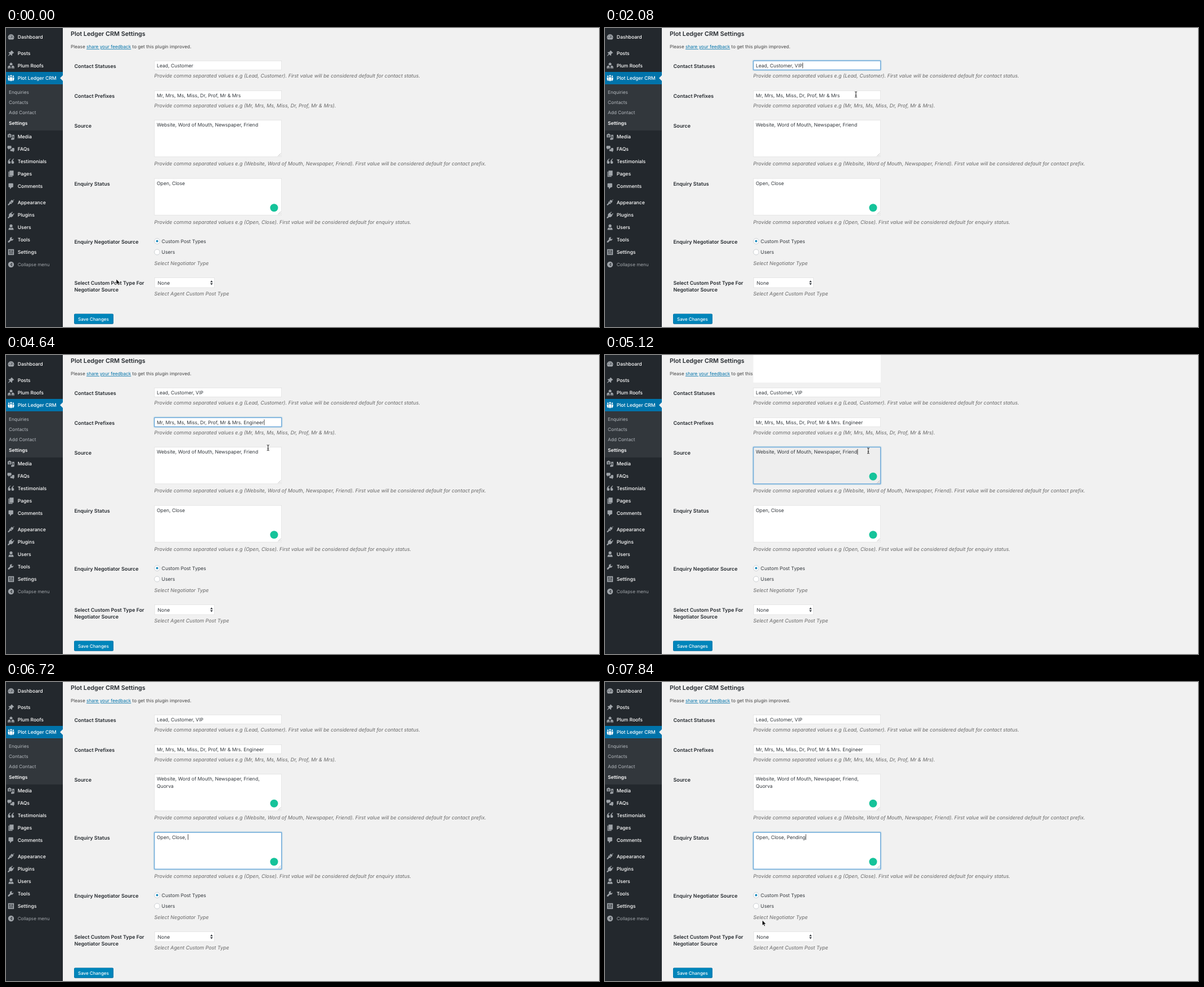
An HTML page that plays this animation: 1054 by 531 pixels, repeating every 8000 ms.

```html
<!DOCTYPE html>
<html lang="en">
<head>
<meta charset="utf-8">
<title>Plugin settings</title>
<style>
html, body { margin: 0; width: 100%; height: 100%; overflow: hidden; background: #f1f1f1; }
svg { display: block; width: 100vw; height: 100vh; }
text { font: 8.65px Inter, "Open Sans", sans-serif; fill: #32373c; white-space: pre; text-rendering: geometricPrecision; }
.menu { font-size: 8.6px; font-weight: 500; fill: #fff; }
.sub { font-size: 8.2px; fill: #b4b9be; }
.on { font-size: 8.4px; font-weight: 600; fill: #fff; }
.small { font-size: 8.1px; fill: #a0a5aa; }
.title { font-size: 10.77px; font-weight: 600; fill: #23282d; }
.para { font-size: 8.17px; fill: #444; }
.link { fill: #0073aa; text-decoration: underline; }
.label { font-size: 8.95px; font-weight: 600; fill: #23282d; }
.hint { font-size: 8.92px; font-style: italic; fill: #666; }
.button { font-size: 8px; font-weight: 500; fill: #fff; }
.box { fill: #fff; stroke: #ddd; stroke-width: .65; }
.box.focus { stroke: #5b9dd9; stroke-width: 1; filter: drop-shadow(0 0 .8px rgba(30, 140, 190, .8)); }
.icon { fill: #a0a5aa; }
.cut { fill: none; stroke: #23282d; stroke-width: 1.5; }
</style>
</head>
<body>
<svg id="stage" viewBox="0 0 1054 531"></svg>
<script>
const LOOP = 8000;
const stage = document.getElementById('stage');
const $ = id => document.getElementById(id);

// y is the vertical middle of the capitals
const text = (x, y, str, cls = '', id = '') =>
  `<text x="${x}" y="${y + 3.2}" class="${cls}" id="${id}">${str.replace(/&/g, '&amp;')}</text>`;
const rect = (x, y, w, h, fill, more = '') =>
  `<rect x="${x}" y="${y}" width="${w}" height="${h}" fill="${fill}" ${more}/>`;
const path = (d, cls = '') => `<path d="${d}" class="${cls}"/>`;
const dot = (x, y, r, more = '') => `<circle cx="${x}" cy="${y}" r="${r}" ${more}/>`;

// Icons are drawn on a 20 x 20 grid
const icons = {
  gauge: path('M4 17a8.5 8.5 0 1 1 12 0z') + path('M9.5 13L13.5 6.5M4 11h2M14 11h2M6 6.5l1.3 1.3M10 4.5v1.6', 'cut'),
  pin: path('M10.4 3l1.2-1.2 6.6 6.6-1.2 1.2-1-.2-3 3 .2 3-1.4 1.3-3.6-3.6-5.6 4.4-.8-.8 4.6-5.6-3.3-3.3 1.4-1.4 3 .2 3-3z'),
  homes: path('M10 1L5 5.5h1.5V9h7V5.5H15zM5 9l-5 5h1.5v4H4v-3h2v3h2.5v-4H10zM15 9l-5 5h1.5v4H14v-3h2v3h2.5v-4H20z'),
  people: dot(10, 4, 2.3) + dot(4, 5, 2) + dot(16, 5, 2) +
    path('M7 7.5h6V13l-1 5H8l-1-5zM1.5 8H6v5l1 4H3l-1.5-4zM14 8h4.5v5L17 17h-4l1-4z'),
  media: path('M1 4h2l1-2h4l1 2h2v8H1zM13 5h6v11a2.5 2.5 0 1 1-2-2.4V8h-2v8.5a2.5 2.5 0 1 1-2-2.4z') + dot(6, 8, 2, 'class="cut"'),
  chat: path('M2 1h7q2 0 2 2v4q0 2-2 2H6l-3 3V9H2Q0 9 0 7V3q0-2 2-2zM13 7h4q2 0 2 2v5q0 2-2 2v3l-3-3h-4q-2 0-2-2v-3h3q2 0 2-2z'),
  quote: path('M8.5 3Q5 6 5.5 9A3.7 3.7 0 1 1 1.5 13Q1 6 8 2zM18 3Q14.5 6 15 9A3.7 3.7 0 1 1 11 13Q10.5 6 17.5 2z'),
  pages: path('M6 1h11v14H6zM3 4h2v12h9v2H3z'),
  bubble: path('M5 2h9q2 0 2 2v7q0 2-2 2h-2l-5 5v-5H5q-2 0-2-2V4q0-2 2-2z'),
  brush: path('M14.5 4.5L18 1l1 1-3.5 3.5 1.5 2-4 4-5-5 4-4zM7.5 7.5l5 5-2 1.5-2-1-5.5 5-2-2 5-5.5-1-2z'),
  plug: path('M13 1l1.5 1.5L11 6l3 3 3.5-3.5L19 7l-3.5 3.5 1 1-3 3q-3 3-6 1L4 19H1v-2l3.5-4q-2-3 1-6l3-3 1 1z'),
  user: dot(10, 6, 4) + path('M3 17q0-6 5-6l2 2 2-2q5 0 5 6z'),
  wrench: path('M16.7 6.5L14 9l-3-3 2.5-2.7q-4-1-6 1.5-1.5 2-.5 4.5l-5.5 5.5q-1 3 2.5 3.5l6-6q3 1 5-1 2-2 1.7-4.8z'),
  sliders: path('M2 2h16v16H2z') + path('M6 4v12M10 4v12M14 4v12M4.5 7h3M8.5 13h3M12.5 8h3', 'cut'),
  collapse: dot(10, 10, 8) + path('M12 6l-4 4 4 4z', 'cut')
};
const icon = (name, y, fill = '') =>
  `<g class="icon" style="fill:${fill}" transform="translate(2.5 ${y - 6.5}) scale(.647)">${icons[name]}</g>`;

const menu = [
  ['gauge', 16, 'Dashboard'], ['pin', 45, 'Posts'], ['homes', 67, 'Plum Roofs'],
  ['people', 89, 'Plot Ledger CRM', '#fff'], ['media', 193, 'Media'], ['chat', 215, 'FAQs'],
  ['quote', 237, 'Testimonials'], ['pages', 259, 'Pages'], ['bubble', 281, 'Comments'],
  ['brush', 310, 'Appearance'], ['plug', 332, 'Plugins'], ['user', 354, 'Users'],
  ['wrench', 376, 'Tools'], ['sliders', 398, 'Settings']
];

// focus: time of the click; start and step: typing times of the added letters
const fields = [
  { y: 58.3, h: 16, mid: 66.5, value: 'Lead, Customer', add: ', VIP', focus: 1000, start: 1240, step: 95 },
  { y: 111.3, h: 16, mid: 119.5, value: 'Mr, Mrs, Ms, Miss, Dr, Prof, Mr & Mrs', add: '. Engineer', focus: 2500, start: 3440, step: 95 },
  { y: 163.8, h: 65, mid: 172, value: 'Website, Word of Mouth, Newspaper, Friend', add: ', Quorva', focus: 4800, start: 5360, step: 64, wrap: true },
  { y: 267.2, h: 65, mid: 275.3, value: 'Open, Close', add: ', Pending', focus: 6480, start: 6520, step: 110 }
];

// Pointer moves: start time, end time, end x, end y
const moves = [
  [80, 900, 400, 68], [1800, 2060, 446, 118], [4400, 4700, 468, 170],
  [5900, 6350, 410, 292], [7440, 7830, 279.5, 423]
];

const hints = [
  [85, 'Provide comma separated values e.g (Lead, Customer). First value will be considered default for contact status.'],
  [138, 'Provide comma separated values e.g (Mr, Mrs, Ms, Miss, Dr, Prof, Mr & Mrs).'],
  [241, 'Provide comma separated values e.g (Website, Word of Mouth, Newspaper, Friend). First value will be considered default for contact prefix.'],
  [344.5, 'Provide comma separated values e.g (Open, Close). First value will be considered default for enquiry status.'],
  [417.5, 'Select Negotiator Type'], [471.5, 'Select Agent Custom Post Type']
];
const labels = [
  [67.5, 'Contact Statuses'], [120.3, 'Contact Prefixes'], [173.3, 'Source'], [276.7, 'Enquiry Status'],
  [380, 'Enquiry Negotiator Source'], [452.5, 'Select Custom Post Type For'], [464.5, 'Negotiator Source']
];

const sidebar = rect(0, 0, 101, 531, '#23282d') + rect(0, 78, 101, 22, '#0073aa') +
  rect(0, 100, 101, 82, '#32373c') + '<path d="M101 84v10l-5-5z" fill="#f1f1f1"/>' +
  menu.map(([name, y, str, fill]) => icon(name, y, fill) + text(20.7, y, str, 'menu')).join('') +
  text(5, 114, 'Enquiries', 'sub') + text(5, 132, 'Contacts', 'sub') +
  text(5, 150, 'Add Contact', 'sub') + text(5, 168.3, 'Settings', 'on') +
  icon('collapse', 420) + text(20.7, 420, 'Collapse menu', 'small');

const field = (f, i) =>
  rect(263.9, f.y, 225.8, f.h, '', `class="box" id="box${i}"`) +
  text(268, f.mid, f.value, '', 'value' + i) +
  (f.h > 20 ? `<path d="M483.5 ${f.y + f.h - 1}l5-5M486.5 ${f.y + f.h - 1}l2-2" stroke="#888" stroke-width=".6"/>` +
    dot(476.5, f.y + 52, 7, `fill="#15c39a" id="badge${i}"`) : '');

const radio = (y, str, on) =>
  dot(268.6, y, 4.9, 'fill="#fff" stroke="#b4b9be" stroke-width=".65"') +
  (on ? dot(268.6, y, 2, 'fill="#1e8cbe"') : '') + text(276.6, y, str);

stage.innerHTML = rect(0, 0, 1054, 531, '#f1f1f1') + sidebar +
  '<text x="115" y="14.2" class="title">Plot Ledger CRM Settings</text>' +
  '<text x="115" y="36.3" class="para">Please <tspan class="link">share your feedback</tspan> to get this plugin improved.</text>' +
  labels.map(([y, str]) => text(121.4, y, str, 'label')).join('') +
  hints.map(([y, str]) => text(263.6, y, str, 'hint')).join('') +
  fields.map(field).join('') + text(268, 184.3, '', '', 'wrapped') +
  radio(378.6, 'Custom Post Types', true) + radio(398, 'Users') +
  rect(264.2, 443.5, 106, 17.5, '', 'class="box"') + text(269.5, 452.4, 'None') +
  '<path d="M363 451.4l2.3-3.2 2.3 3.2zM363 453.2l2.3 3.2 2.3-3.2z" fill="#32373c"/>' +
  rect(121, 507.5, 70, 18.2, '#006799', 'rx="2"') + rect(121.4, 507.9, 69.2, 16.9, '#0085ba', 'rx="1.8"') +
  text(128, 516.6, 'Save Changes', 'button') +
  rect(263.6, 0, 226.4, 49, '#fff', 'id="flash"') +
  rect(0, 0, .8, 10, '#222', 'id="caret"') +
  '<path id="arrow" d="M0 0v9.5l2.2-2 1.5 3.3 1.6-.7-1.5-3.2h3z" fill="#000" stroke="#fff" stroke-width=".7"/>' +
  '<path id="beam" d="M-2-5q2 0 2 1.5q0-1.5 2-1.5M0-3.5v7M-2 5q2 0 2-1.5q0 1.5 2 1.5M-1.2 1.5h2.4" fill="none" stroke="#222" stroke-width="1"/>';

const show = (el, visible) => el.setAttribute('visibility', visible ? 'visible' : 'hidden');

function drawFields(t) {
  show($('caret'), false);
  fields.forEach((f, i) => {
    const typed = t < f.start ? 0 : Math.min(f.add.length, Math.floor((t - f.start) / f.step) + 1);
    const wrapped = f.wrap && typed === f.add.length;
    const value = $('value' + i);
    value.textContent = f.value + (wrapped ? ',' : f.add.slice(0, typed));
    if (f.wrap) $('wrapped').textContent = wrapped ? f.add.slice(2) : '';

    const next = fields[i + 1];
    const focused = t >= f.focus && (!next || t < next.focus);
    $('box' + i).classList.toggle('focus', focused);
    if (!focused) return;

    const lastKey = typed ? f.start + (typed - 1) * f.step : f.focus;
    const line = wrapped ? $('wrapped') : value;
    $('caret').setAttribute('x', 268.3 + line.getComputedTextLength());
    $('caret').setAttribute('y', f.mid - 5 + (wrapped ? 12.3 : 0));
    show($('caret'), (t - lastKey) % 1000 < 500);
  });

  // The third box briefly loses its background when the checker attaches
  const flash = t >= 5040 && t < 5270;
  show($('flash'), flash);
  $('box2').style.fill = flash ? '#eee' : '';
  show($('badge2'), t >= 5040);
}

function drawPointer(t) {
  let x = 196, y = 446;
  for (const [from, to, endX, endY] of moves) {
    const p = Math.max(0, Math.min(1, (t - from) / (to - from)));
    const ease = p * p * (3 - 2 * p);
    x += (endX - x) * ease;
    y += (endY - y) * ease;
  }
  const typing = fields.some((f, i) => t >= f.start && t < moves[i + 1][0]);
  const overField = x > 264 && x < 490 && fields.some(f => y > f.y && y < f.y + f.h);
  for (const id of ['arrow', 'beam']) {
    $(id).setAttribute('transform', `translate(${x} ${y})`);
    show($(id), !typing && overField === (id === 'beam'));
  }
}

const begin = performance.now();
function draw() {
  const t = (performance.now() - begin) % LOOP;
  drawFields(t);
  drawPointer(t);
  requestAnimationFrame(draw);
}
draw();
</script>
</body>
</html>
```
